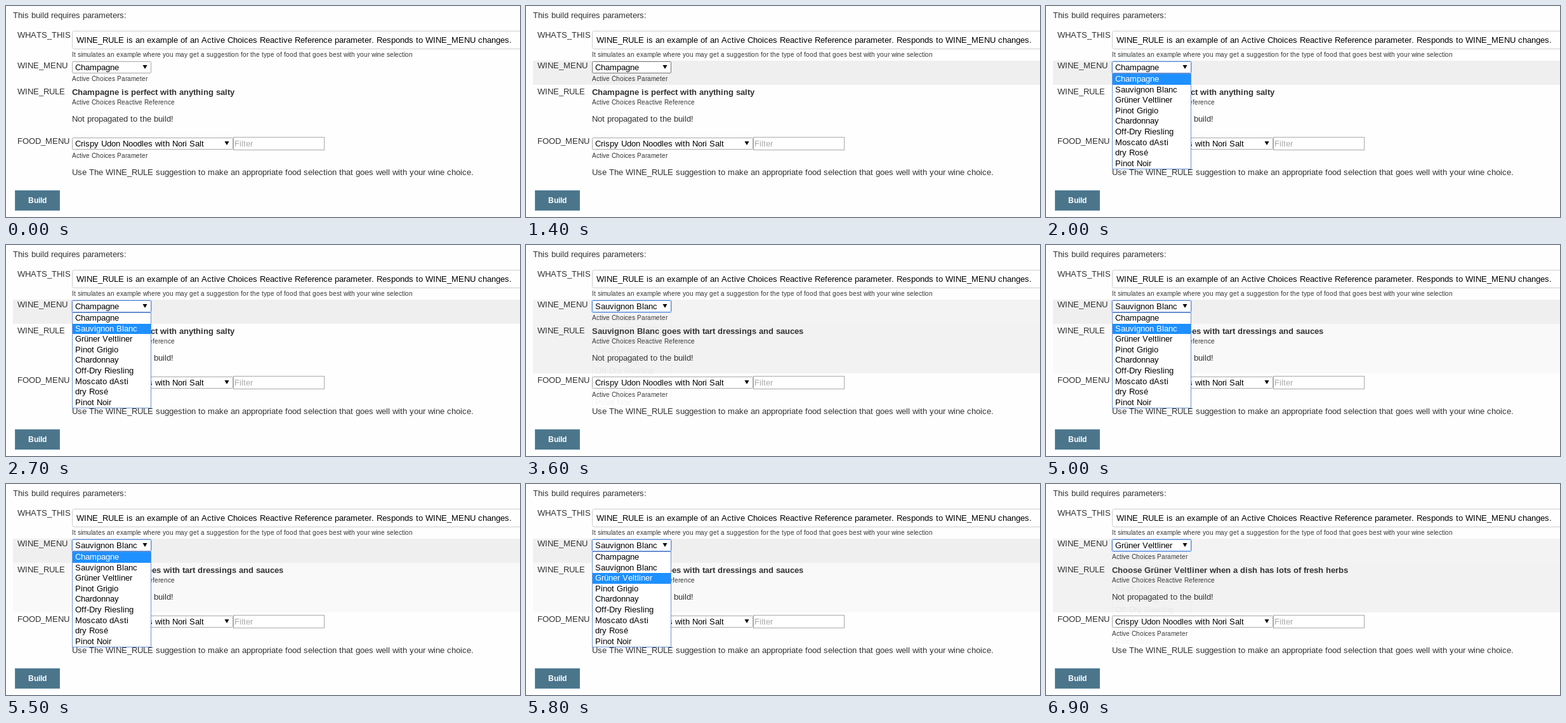
An HTML page for the animation above (8000 ms loop, 810 by 332 pixels).

```html
<!DOCTYPE html>
<html lang="en">
<head>
<meta charset="utf-8">
<title>Build parameters</title>
<style>
  html, body { margin: 0; width: 100%; height: 100%; overflow: hidden; background: #fefefe; }
  svg { display: block; width: 810px; height: 332px; }
  text { font: 13px "Liberation Sans", Arial, sans-serif; fill: #333; }
  .field { fill: #000; }
  .hint { fill: #a9a9a9; }
  .note { font-size: 10px; }
  .bold { font-weight: bold; }
  .button { font-size: 12px; font-weight: bold; fill: #fff; }
  .box { fill: #fff; stroke: #a9a9a9; }
</style>
</head>
<body>
<svg id="stage" viewBox="0 0 810 332"></svg>
<script>
const LOOP = 8000;
const WINES = ["Champagne", "Sauvignon Blanc", "Grüner Veltliner", "Pinot Grigio", "Chardonnay",
  "Off-Dry Riesling", "Moscato dAsti", "dry Rosé", "Pinot Noir"];
const RULES = ["Champagne is perfect with anything salty",
  "Sauvignon Blanc goes with tart dressings and sauces",
  "Choose Grüner Veltliner when a dish has lots of fresh herbs"];
const stage = document.getElementById("stage");
const ruler = document.createElement("canvas").getContext("2d");

function add(tag, attrs, content = "", parent = stage) {
  const node = document.createElementNS("http://www.w3.org/2000/svg", tag);
  for (const key in attrs) node.setAttribute(key, attrs[key]);
  node.textContent = content;
  return parent.appendChild(node);
}

// Letters advance by whole pixels, as in hinted screen type; measured at 100 times the size
function setText(node, x, content) {
  if (node.textContent === content) return;
  const { fontWeight, fontSize, fontFamily } = getComputedStyle(node);
  ruler.font = `${fontWeight} ${parseFloat(fontSize) * 100}px ${fontFamily}`;
  const positions = [];
  for (const letter of content) {
    positions.push(x);
    x += Math.round(ruler.measureText(letter).width / 100);
  }
  node.setAttribute("x", positions.join(" "));
  node.textContent = content;
}

function text(x, y, content, cls = "", parent = stage) {
  const node = add("text", { y, class: cls }, "", parent);
  setText(node, x, content);
  return node;
}
const box = (x, y, width, height, rx = 0) =>
  add("rect", { x: x + .5, y: y + .5, width: width - 1, height: height - 1, rx, class: "box" });
const arrow = (x, y) => add("path", { d: `M${x} ${y}h7l-3.5 6z` });
const row = (y, height) => add("rect", { x: 11, y, width: 799, height });

// Row backgrounds
const rows = [row(38, 48), row(86, 38), row(124, 78)];

// Form
text(11, 19, "This build requires parameters:");
text(18, 50, "WHATS_THIS");
box(104, 39, 720, 29, 3).style.stroke = "#ccc";
text(111, 58, "WINE_RULE is an example of an Active Choices Reactive Reference parameter. Responds to WINE_MENU changes.", "field");
text(104, 80, "It simulates an example where you may get a suggestion for the type of food that goes best with your wine selection", "note");

text(18, 98, "WINE_MENU");
const focusRing = box(103, 86, 127, 21, 2);
focusRing.style.stroke = "#b4cbf0";
const wineBox = box(104, 87, 125, 19, 1);
const wineText = text(109, 101, "", "field");
arrow(215.5, 93);
text(104, 118, "Active Choices Parameter", "note");

text(18, 139, "WINE_RULE");
const ruleText = text(104, 140, "", "bold");
text(104, 155, "Active Choices Reactive Reference", "note");
text(104, 182, "Not propagated to the build!");

text(18, 217, "FOOD_MENU");
box(104, 207, 254, 19, 1);
text(109, 221, "Crispy Udon Noodles with Nori Salt", "field");
arrow(344.5, 213);
box(358, 206, 144, 21);
text(360, 221, "Filter", "hint");
text(104, 239, "Active Choices Parameter", "note");
text(104, 266, "Use The WINE_RULE suggestion to make an appropriate food selection that goes well with your wine choice.");

box(14, 290, 71, 32).style.cssText = "fill:#4b758b;stroke:#5788a1";
text(35, 310, "Build", "button");

// Drop-down list
const menu = add("g", {});
add("rect", { x: 104.5, y: 106.5, width: 124, height: 150, fill: "#fff", stroke: "#6d93d1" }, "", menu);
const optionTop = i => Math.round(107 + 16.6 * i);
const marker = add("rect", { x: 105, width: 123, fill: "#1e90ff" }, "", menu);
const options = WINES.map((wine, i) => text(109, optionTop(i) + 12, wine, "field", menu));

// Each entry changes only the listed values; menu is the opacity of the list
const TIMELINE = [
  [0, { wine: 0, menu: 0, hover: -1, focus: false, border: "#a9a9a9", rows: ["none", "none", "none"] }],
  [600, { rows: ["#efefef", "none", "none"] }],
  [900, { rows: ["none", "#efefef", "none"] }],
  [1400, { border: "#777" }],
  [2000, { menu: 1, hover: 0, focus: true, border: "#5b86d0" }],
  [2700, { hover: 1 }],
  [3600, { wine: 1, menu: .04, hover: -1, border: "#4d86d8", rows: ["none", "#f3f3f3", "#f2f2f2"] }],
  [4300, { rows: ["none", "#efefef", "#f9f9f9"] }],
  [4500, { border: "#5b86d0" }],
  [5000, { menu: 1, hover: 1 }],
  [5500, { hover: 0 }],
  [5600, { hover: 1 }],
  [5800, { hover: 2 }],
  [6900, { wine: 2, menu: .04, hover: -1, border: "#4d86d8", rows: ["none", "#f3f3f3", "#f2f2f2"] }]
];

function render(time) {
  const past = TIMELINE.filter(([start]) => start <= time);
  const state = Object.assign({}, ...past.map(entry => entry[1]));
  rows.forEach((rect, i) => rect.setAttribute("fill", state.rows[i]));
  setText(wineText, 109, WINES[state.wine]);
  setText(ruleText, 104, RULES[state.wine]);
  wineBox.style.stroke = state.border;
  focusRing.style.display = state.focus ? "" : "none";
  menu.style.opacity = state.menu;
  const { hover } = state;
  marker.style.display = hover < 0 ? "none" : "";
  marker.setAttribute("y", optionTop(hover));
  marker.setAttribute("height", optionTop(hover + 1) - optionTop(hover));
  options.forEach((option, i) => option.style.fill = i === hover ? "#fff" : "#000");
}

const begin = performance.now();
function tick() {
  render((performance.now() - begin) % LOOP);
  requestAnimationFrame(tick);
}
tick();
</script>
</body>
</html>
```
